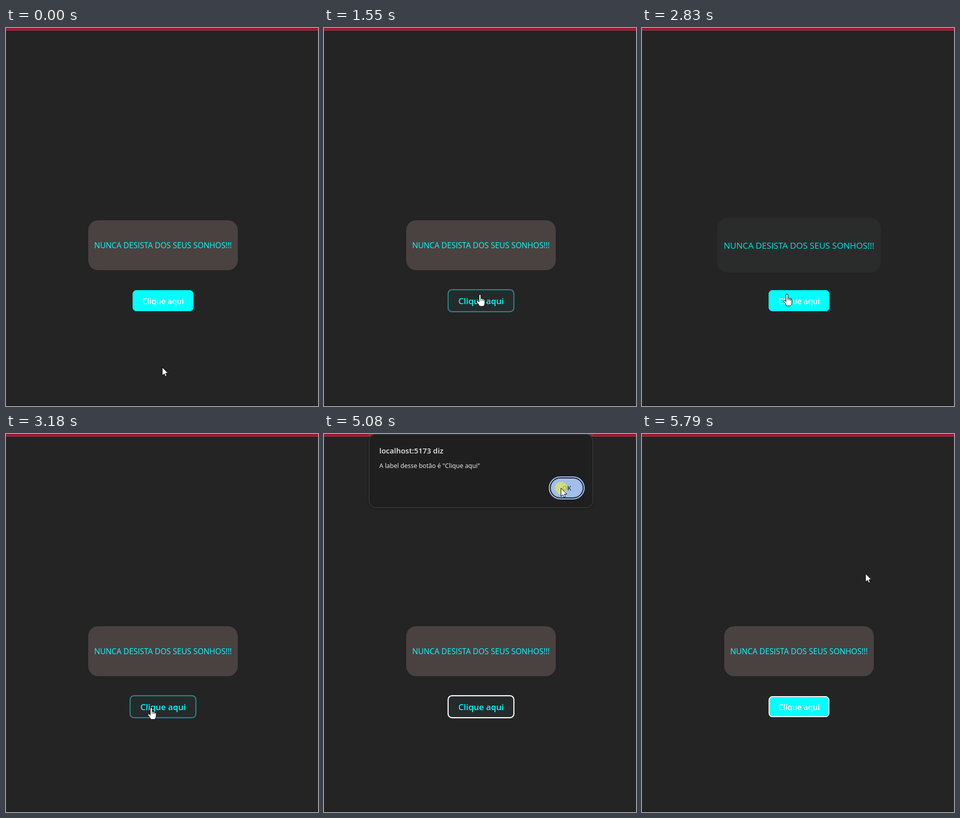
These frames come from a looping animation (626x757 px, 5860 ms). An HTML page with a canvas:

```html
<!DOCTYPE html>
<html lang="pt">
<head>
<meta charset="utf-8">
<title>Clique aqui</title>
<style>
html, body { margin: 0; width: 100%; height: 100%; overflow: hidden; background: #242424; }
canvas { display: block; }
</style>
</head>
<body>
<canvas id="stage" width="626" height="757"></canvas>
<script>
const ctx = document.getElementById('stage').getContext('2d');
const LOOP = 5860;
const FADE = 300;

const STEP = 68.5;
const BURSTS = [0, 390, 1480, 2290, 2690, 3440, 3910, 5080];

const HOME = { x: 313, y: 679 };
const MOVES = [
  { from: 360, to: 930, x: 317, y: 549 },
  { from: 1430, to: 1910, x: 288, y: 449 },
  { from: 2220, to: 2360, x: 288, y: 447 },
  { from: 2640, to: 2887, x: 291, y: 548 },
  { from: 3840, to: 4470, x: 475, y: 117 },
  { from: 4470, to: 4680, x: 475, y: 108 },
  { from: 5370, to: 5780, x: 448, y: 280 }
];

const CARD = { x: 315, y: 435, w: 300, h: 100, r: 20, hovers: [[1714, 2805]] };
const BUTTON = { x: 315, y: 546.1, w: 122, h: 42, r: 8, hovers: [[796, 1600], [2832, 5400]] };
const CLICKS = [[3440, 3530], [5080, 5220]];
const DIALOG = { open: 3490, shut: 5270 };

const clamp = v => Math.min(1, Math.max(0, v));
const mix = (a, b, p) => a + (b - a) * p;
const blend = (a, b, p) => `rgb(${a.map((v, i) => Math.round(mix(v, b[i], p))).join()})`;
const ramp = (t, from, to) => clamp((t - from) / (to - from));
const smooth = p => p * p * (3 - 2 * p);

// CSS "ease": cubic-bezier(.25, .1, .25, 1)
function ease(x) {
  if (x <= 0 || x >= 1) return clamp(x);
  const curve = (s, a, b) => 3 * s * (1 - s) ** 2 * a + 3 * s * s * (1 - s) * b + s ** 3;
  let lo = 0, hi = 1;
  for (let i = 0; i < 24; i++) {
    const mid = (lo + hi) / 2;
    if (curve(mid, 0.25, 0.25) < x) lo = mid; else hi = mid;
  }
  return curve(lo, 0.1, 1);
}

function snap(t) {
  const start = BURSTS.filter(b => b <= t).pop();
  return start + STEP * Math.floor((t - start) / STEP);
}

function pointerAt(t) {
  return MOVES.reduce((pos, move) => {
    const p = smooth(ramp(t, move.from, move.to));
    return { x: mix(pos.x, move.x, p), y: mix(pos.y, move.y, p) };
  }, HOME);
}

const hoverOf = (box, t) => box.hovers.reduce(
  (v, [on, off]) => v + ease((t - on) / FADE) - ease((t - off) / FADE), 0);

const contains = (box, x, y) => Math.abs(x - box.x) < box.w / 2 && Math.abs(y - box.y) < box.h / 2;

function roundRect(x, y, w, h, r, fill, stroke, width = 1) {
  ctx.beginPath();
  ctx.roundRect(x, y, w, h, r);
  if (fill) { ctx.fillStyle = fill; ctx.fill(); }
  if (stroke) { ctx.strokeStyle = stroke; ctx.lineWidth = width; ctx.stroke(); }
}

function text(str, x, y, font, color, align = 'left') {
  ctx.font = font + ' "Open Sans", "Noto Sans", sans-serif';
  ctx.textAlign = align;
  ctx.fillStyle = color;
  ctx.fillText(str, x, y);
}

// Draws around the centre of a box, enlarged by up to a tenth.
function scaled(box, p, draw) {
  ctx.save();
  ctx.translate(box.x, box.y);
  ctx.scale(1 + 0.1 * p, 1 + 0.1 * p);
  draw(-box.w / 2, -box.h / 2);
  ctx.restore();
}

function drawPage() {
  const band = (y, h, color) => {
    ctx.fillStyle = color;
    ctx.fillRect(0, y, 626, h);
  };
  band(0, 757, '#242424');
  band(0, 4, '#a31129');
  band(4, 1, '#b9405a');
  band(756, 1, '#141414');
}

function drawCard(t) {
  const p = hoverOf(CARD, t);
  scaled(CARD, p, (x, y) => {
    roundRect(x, y, CARD.w, CARD.h, CARD.r, blend([73, 66, 65], [40, 43, 43], p));
    text('NUNCA DESISTA DOS SEUS SONHOS!!!', 0, 6, '15.6px', blend([10, 255, 255], [0, 232, 226], p), 'center');
  });
}

function drawButton(t) {
  const p = hoverOf(BUTTON, t);
  const { w, h, r } = BUTTON;
  scaled(BUTTON, p, (x, y) => {
    roundRect(x, y, w, h, r, blend([0, 255, 255], [37, 43, 43], p));
    const focused = t >= DIALOG.open;
    const edge = focused ? '#fff' : blend([0, 255, 255], [36, 135, 135], p);
    roundRect(x + 1, y + 1, w - 2, h - 2, r - 1, null, edge, 2);
    text('Clique aqui', 0.3, 6.4, '600 15.4px', blend([255, 255, 255], [0, 255, 255], p), 'center');
  });
}

function drawDialog(t) {
  const alpha = ramp(t, DIALOG.open, DIALOG.open + 120) * (1 - ramp(t, DIALOG.shut, DIALOG.shut + 150));
  if (!alpha) return;
  ctx.save();
  ctx.globalAlpha = alpha;
  ctx.fillStyle = '#8a3527';
  ctx.fillRect(89, 0, 452, 4);
  ctx.shadowColor = 'rgba(0,0,0,.3)';
  ctx.shadowBlur = 4;
  ctx.shadowOffsetY = 1;
  roundRect(90, 0, 450, 148, 14, '#1f1f1f');
  ctx.shadowColor = 'transparent';
  roundRect(90.5, 0.5, 449, 147, 13.5, null, '#444444');
  text('localhost:5173 diz', 111, 39, '600 15px', '#e8e8e8');
  text('A label desse botão é "Clique aqui"', 111, 68, '12.5px', '#f4f4f4');
  roundRect(452, 86, 70, 44, 22, null, '#a8c7fa', 2);
  roundRect(455, 89, 64, 38, 19, blend([174, 202, 248], [164, 189, 233], ramp(t, 4390, 4470)));
  text('OK', 487, 112.6, '600 12.6px', '#1c3a6b', 'center');
  ctx.restore();
}

const ARROW = new Path2D('M0 0V16.6L3.9 13L6.3 18.3L9 17.1L6.7 12H11.8Z');
const HAND = new Path2D('M-2 1.5Q-2-.5-.2-.5T1.7 1.5V7.5Q4 6.2 4.8 8.3Q6.8 7.3 7.4 9.3Q9.8 8.6 9.8 11V16' +
  'Q9.8 20 7.2 23H-.8Q-2.5 19-6.5 14.8Q-7.3 13-5.8 12.2Q-4.3 11.6-2 14.3Z');
const KNUCKLES = new Path2D('M1.7 7.5V11.5M4.8 8.3V12M7.4 9.3V12.5');

function drawPointer(t) {
  const { x, y } = pointerAt(t);
  const onButton = contains(BUTTON, x, y);
  ctx.save();
  ctx.translate(x, y);
  if (CLICKS.some(([down, up]) => t >= down && t < up)) {
    ctx.fillStyle = 'rgba(232,240,60,.62)';
    ctx.beginPath();
    ctx.arc(0.5, 0, 12.3, 0, 2 * Math.PI);
    ctx.fill();
  }
  ctx.translate(0.5, 0.5);
  ctx.lineWidth = 1;
  ctx.lineJoin = 'round';
  ctx.strokeStyle = '#000';
  ctx.fillStyle = '#fff';
  const shape = onButton ? HAND : ARROW;
  ctx.fill(shape);
  ctx.stroke(shape);
  if (onButton) ctx.stroke(KNUCKLES);
  ctx.restore();
}

function draw(t) {
  drawPage();
  drawCard(t);
  drawButton(t);
  drawDialog(t);
  drawPointer(t);
}

const began = performance.now();
function tick() {
  draw(snap((performance.now() - began) % LOOP));
  requestAnimationFrame(tick);
}
tick();
</script>
</body>
</html>
```
